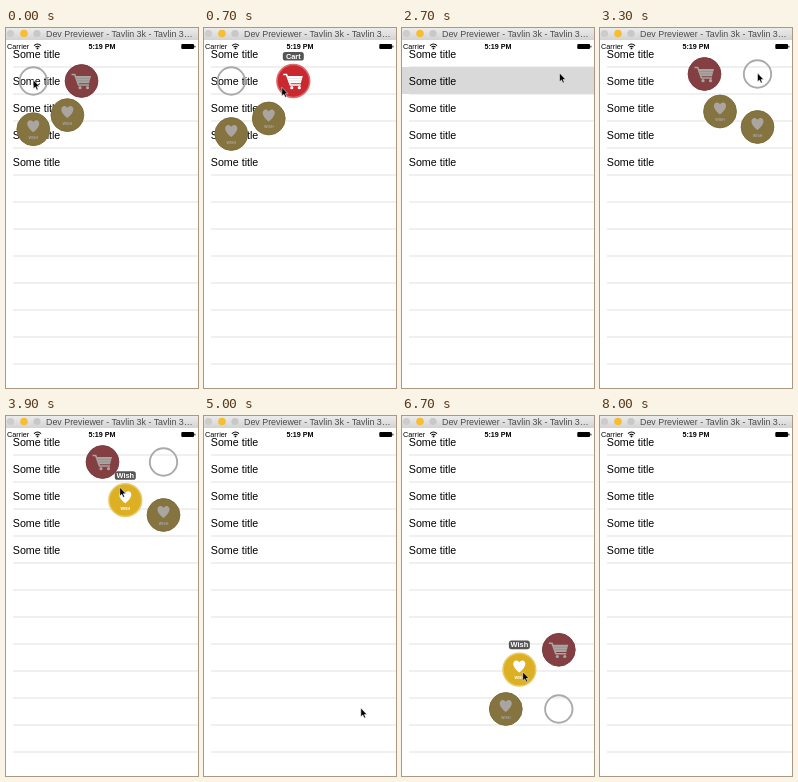
Write an HTML page that moves like this. It is 192 by 360 pixels and loops after 8.1 s.

```html
<!DOCTYPE html>
<html lang="en">
<head>
<meta charset="utf-8">
<title>Radial context menu</title>
<style>
  html, body { margin: 0; width: 100%; height: 100%; overflow: hidden; background: #fff; }
  svg { display: block; width: 100%; height: 100%; }
  text { font-family: "Liberation Sans", Arial, sans-serif; }
  .cart { --dim: #843f43; --lit: #c9282f; --rim: #7a3a3e; --lit-rim: #dc6a6e; }
  .wish { --dim: #85743f; --lit: #ddb024; --rim: #7d6d3a; --lit-rim: #e9ca68; }
  .item { color: #aaa5a0; }
  .item .disc { fill: var(--dim); stroke: var(--rim); }
  .item.lit { color: #fff; }
  .item.lit .disc { fill: var(--lit); stroke: var(--lit-rim); stroke-width: 1.5; }
  .label { display: none; }
  .lit .label { display: inline; }
</style>
</head>
<body>
<svg viewBox="0 0 192 360">
  <defs>
    <linearGradient id="bar" x2="0" y2="1">
      <stop stop-color="#ececec"/><stop offset="1" stop-color="#d3d3d3"/>
    </linearGradient>
  </defs>
  <rect width="192" height="360" fill="#fff"/>
  <rect id="pressed" y="39" width="192" height="27" fill="#d9d9d9"/>
  <g id="rows"></g>

  <rect width="192" height="12" fill="url(#bar)"/>
  <circle cx="4.5" cy="5.5" r="3.6" fill="#cfcbc8"/>
  <circle cx="18" cy="5.5" r="3.8" fill="#f8bd30"/>
  <circle cx="31" cy="5.5" r="3.6" fill="#c8c8c8"/>
  <text x="40" y="8.6" font-size="8.9" fill="#4c4c4c">Dev Previewer - Tavlin 3k - Tavlin 3…</text>

  <text x="1" y="21" font-size="7.3">Carrier</text>
  <g fill="none" stroke="#000" stroke-width="1.1">
    <path d="M28 17.6Q31.5 14.4 35 17.6M29.5 19.2Q31.5 17.4 33.5 19.2"/>
    <circle cx="31.5" cy="20.4" r=".4"/>
  </g>
  <text x="96" y="21" font-size="7.2" font-weight="bold" text-anchor="middle">5:19 PM</text>
  <rect x="175.3" y="16" width="12.7" height="5" rx="1"/>
  <rect x="188.4" y="17.5" width="1" height="2" rx=".5"/>

  <g id="menu">
    <circle r="13.7" fill="none" stroke="#aaa" stroke-width="1.9"/>
  </g>
  <g id="cursor">
    <path transform="scale(.88)" d="M0 0V10L2.3 7.9L3.9 11.4L5.5 10.7L4 7.3H7Z" stroke="#fff" stroke-width=".6"/>
  </g>
</svg>
<script>
const LOOP = 8100, STEP = 100, OPENING = 300, CLOSING = 200, LIFTING = 180;
const RADIUS = 53, LIFT = 9, REACH = 51;
const $ = id => document.getElementById(id);
const progress = (t, from, length) => Math.max(0, Math.min(1, (t - from) / length));
const easeIn = p => p * p;
const easeOut = p => 1 - easeIn(1 - p);
const mix = (a, b, p) => a + (b - a) * p;
const polar = (r, degrees) => {
  const a = degrees * Math.PI / 180;
  return { x: r * Math.cos(a), y: r * Math.sin(a) };
};

// The pointer sweeps a quarter turn over the three items, then leaves for the next menu.
const menus = [
  { x: 27.3, y: 53, angle: 0, turn: 45, open: -210, sweep: 600, sweeping: 1100, close: 1900, leave: 1900, arrive: 2500 },
  { x: 157.5, y: 46, angle: 180, turn: -45, open: 2850, sweep: 3680, sweeping: 640, close: 4400, leave: 4600, arrive: 5000 },
  { x: 156.8, y: 293, angle: 270, turn: -45, open: 5650, sweep: 6500, sweeping: 400, close: 7000, leave: 7300, arrive: 7700 }
];
const exit = { x: 186, y: 9 };

const icons = {
  cart: `<path d="M-10-6.5H-6.8L-3 4H7.5" fill="none" stroke="currentColor" stroke-width="1.6"/>
    <path d="M-6-5H9.5L7.5 2.3H-3.5Z" fill="currentColor"/>
    <path d="M-5-2.6H9M-4.2-.1H8.4" stroke="#0003" stroke-width=".6"/>
    <circle cx="-1.5" cy="6.7" r="1.6" fill="currentColor"/>
    <circle cx="6" cy="6.7" r="1.6" fill="currentColor"/>`,
  wish: `<path d="M0 3C-9-4-6-9-3-9C-1.4-9-.4-8 0-7C.4-8 1.4-9 3-9C6-9 9-4 0 3Z" fill="currentColor"/>
    <text y="9.7" font-size="3.7" font-weight="bold" text-anchor="middle" fill="currentColor">WISH</text>`
};

function addItem(kind, title) {
  $("menu").insertAdjacentHTML("beforeend", `<g class="item ${kind}">
    <circle class="disc" r="16.4"/>${icons[kind]}
    <g class="label"><rect x="-10.5" y="-29" width="21" height="8.6" rx="2.6" fill="#555"/>
    <text y="-22.1" font-size="7.4" font-weight="bold" text-anchor="middle" fill="#fff">${title}</text></g></g>`);
  return $("menu").lastElementChild;
}
const items = [addItem("cart", "Cart"), addItem("wish", "Wish"), addItem("wish", "Wish")];

let rows = "";
for (let i = 0; i < 12; i++) {
  const y = 39 + 27 * i;
  rows += `<path d="M7 ${y}H192" stroke="#dedee0" stroke-width=".9"/>`;
  if (i < 5) rows += `<text x="6.8" y="${y - 9.3}" font-size="10.7">Some title</text>`;
}
$("rows").innerHTML = rows;

const place = (node, { x, y }) => node.setAttribute("transform", `translate(${x} ${y})`);
const show = (node, on) => { node.style.display = on ? "" : "none"; };

// An item lights up when the pointer's angle is nearest to its own.
function litFrom(menu, i) {
  if (i === 0) return menu.sweep - 100;
  if (i === items.length) return menu.close + CLOSING;
  return menu.sweep + menu.sweeping * (i - .5) / (items.length - 1);
}

function drawMenu(t) {
  const menu = menus.find(m => t >= m.open && t < m.close + CLOSING);
  show($("menu"), menu);
  if (!menu) return;
  place($("menu"), menu);
  const spread = easeOut(progress(t, menu.open, OPENING)) * (1 - easeOut(progress(t, menu.close, CLOSING)));
  items.forEach((item, i) => {
    const on = litFrom(menu, i), off = litFrom(menu, i + 1);
    const lift = LIFT * (easeIn(progress(t, on, LIFTING)) - easeIn(progress(t, off, LIFTING)));
    place(item, polar((RADIUS + lift) * spread, menu.angle + menu.turn * i));
    item.classList.toggle("lit", t >= on && t < off);
  });
}

function drawPointer(t) {
  const i = menus.findIndex(m => t < m.arrive);
  show($("cursor"), i >= 0);
  if (i < 0) return;
  const menu = menus[i], next = menus[i + 1] || exit;
  const reach = REACH * progress(t, menu.sweep - 300, 300);
  const swept = 2 * menu.turn * progress(t, menu.sweep, menu.sweeping);
  const offset = polar(reach, menu.angle + swept);
  const away = progress(t, menu.leave, menu.arrive - menu.leave);
  place($("cursor"), {
    x: mix(menu.x + offset.x, next.x, away),
    y: mix(menu.y + offset.y, next.y, away) - 1
  });
}

function draw(t) {
  show($("pressed"), t >= 2700 && t < 2900);
  drawMenu(t);
  drawPointer(t);
}

const start = performance.now();
function tick() {
  const t = (performance.now() - start) % LOOP;
  draw(Math.floor(t / STEP) * STEP);
  requestAnimationFrame(tick);
}
tick();
</script>
</body>
</html>
```
